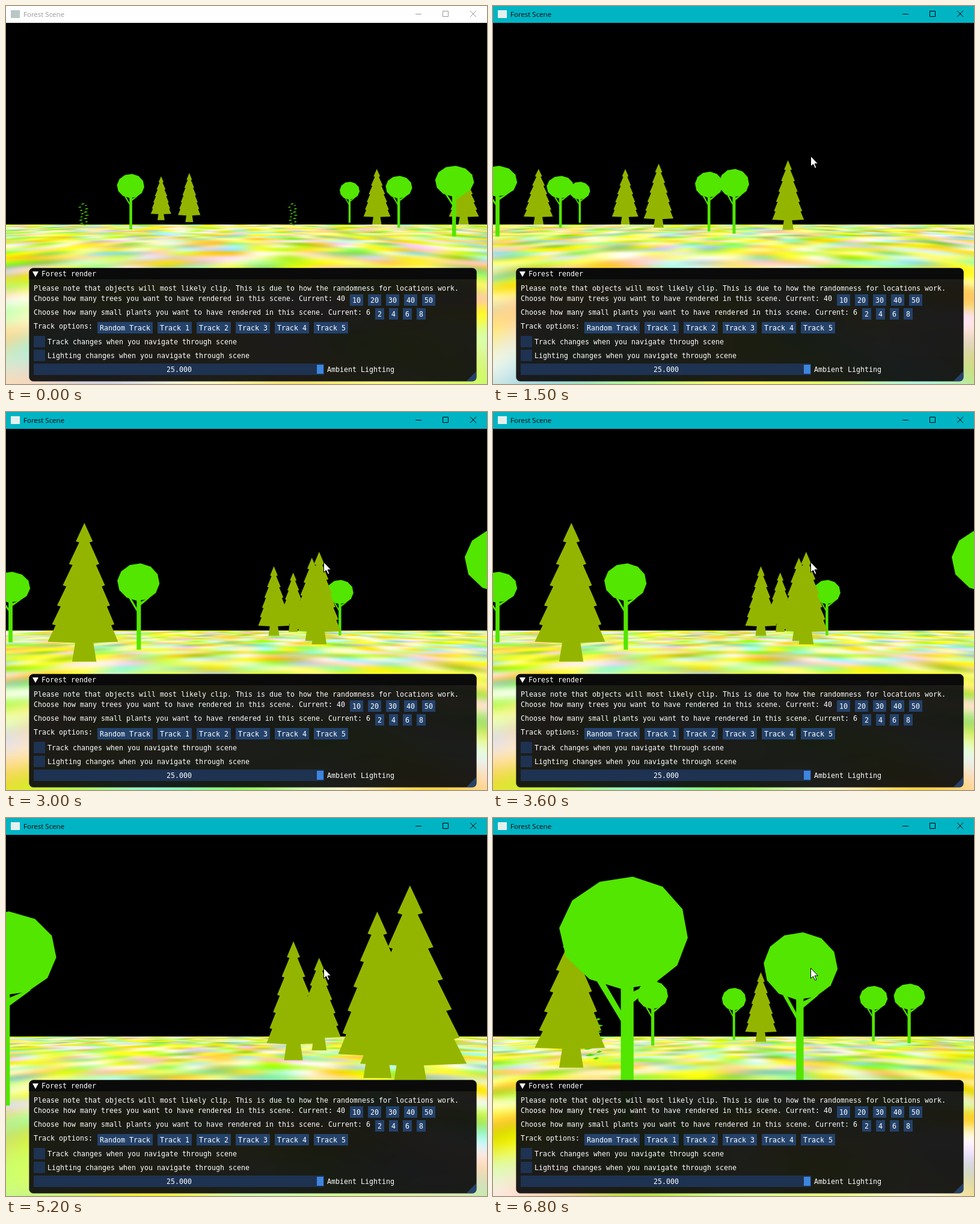
Animation of 800x628 px, one loop 7200 ms. Source, as an HTML page with a canvas:

```html
<!DOCTYPE html>
<html lang="en">
<head>
<meta charset="utf-8">
<title>Forest Scene</title>
<style>
  html, body { margin: 0; height: 100%; overflow: hidden; background: #000; }
  canvas { display: block; }
</style>
</head>
<body>
<canvas id="stage" width="800" height="628"></canvas>
<script>
const ctx = document.getElementById('stage').getContext('2d');
const LOOP = 7200, STEP = 100;
const FOCAL = 541, CX = 400, CY = 328.5, FAR = 20, HORIZON = 363, EYE = 1.27;
const CELLS = 1.5, CELL = 24, TEXEL = CELLS * CELL;   // cells per unit, texels per cell and per unit

let seed = 11;
const random = () => (seed = seed * 16807 % 2147483647) / 2147483647;
const range = (n, f) => Array.from({ length: n }, (_, i) => f(i));
const mirror = side => [...side, ...side.map(([r, y]) => [-r, y]).reverse()];

// Outlines in world units: [signed distance from the axis, height below eye level]
function roundTree() {
  const crown = range(12, i => {
    const a = (i * 30 + 5) * Math.PI / 180;
    return [.555 * Math.sin(a), -.763 - .52 * Math.cos(a)];
  });
  const trunk = mirror([[.056, -.3], [.056, 1.104]]);
  const branch = (side, reach, fork) =>
    [[side * .05, fork], [side * reach, -.32], [side * (reach - .07), -.3], [side * .05, fork - .1]];
  return [crown, trunk, branch(-1, .26, .06), branch(1, .28, -.12)];
}

function pineTree() {
  const tiers = range(6, i => {
    const r = .14 + .115 * i - .0055 * i * i, y = -1.26 + .43 * i - .012 * i * i;
    return [[r, y], [r - .055, y + .018]];
  }).flat().slice(0, -1);
  return [mirror([[0, -1.6], ...tiers, [.15, .61], [.2, .957]])];
}

function plant() {
  return range(14, i => {
    const x = (i % 2 ? .13 : -.13) * (.3 + random()), y = i * .07, w = .05 + random() * .06;
    return [[x - w, y + .02], [x, y - .02], [x + w, y], [x, y + .03]];
  });
}

const grove = (parts, color, offset, places) => places.split(' ').map(place => {
  const [x, z] = place.split(',').map(Number);
  return { parts, color, x: x + offset, z };
});
const forest = [
  ...grove(roundTree(), '#52e600', .02,
    '7,11 7,15 6,19 -5,14 14,13 15,12 7,23 12,29 19,25 7,31 19,34 32,28 30,37 33,40 34,30 39,39 40,38'),
  ...grove(pineTree(), '#94b500', .01,
    '6,15 10,15 -5,19 -3,17 12,13 5,25 11,23 12,26 17,29 17,12 16,32 17,34 17,30 30,31 34,37'),
  ...grove(plant(), '#4cd800', 0, '2,14 -7,14 30,32')
].sort((a, b) => b.z - a.z);

function makeGround(columns, rows) {
  const cells = new OffscreenCanvas(columns, rows), c = cells.getContext('2d');
  for (let i = 0; i < columns * rows; i++) {
    c.fillStyle = `rgb(${130 + random() * 220},${195 + random() * 110},${random() * 280 - 10})`;
    c.fillRect(i % columns, Math.floor(i / columns), 1, 1);
  }
  const smooth = new OffscreenCanvas(columns * CELL, rows * CELL), s = smooth.getContext('2d');
  s.imageSmoothingQuality = 'high';
  s.drawImage(cells, 0, 0, smooth.width, smooth.height);
  return smooth;
}
const ground = makeGround(110, 75);

function cameraAt(t) {
  for (const [from, to] of [[2400, 3000], [5800, 6000], [6300, 6500]]) if (t > from && t < to) t = from;
  const walk = (from, to, units) => Math.round(units * Math.min(1, Math.max(0, (t - from) / (to - from))));
  return {
    x: walk(0, 1000, 5) + walk(1000, 1500, 10) + walk(5200, 6800, 18),
    z: walk(1500, 2500, 20) + walk(4500, 5000, 5)
  };
}

function rect(x, y, w, h, color) {
  ctx.fillStyle = color;
  ctx.fillRect(x, y, w, h);
}

function polygon(points, color) {
  ctx.beginPath();
  points.forEach(p => ctx.lineTo(...p));
  ctx.closePath();
  ctx.fillStyle = color;
  ctx.fill();
}

function drawGround(cam) {
  for (let y = HORIZON; y < 628; y++) {
    const z = EYE * FOCAL / (y + .5 - CY), width = 800 * z / FOCAL;
    ctx.drawImage(ground, (cam.x + 20 - width / 2) * TEXEL, Math.floor((cam.z + z) * TEXEL),
      width * TEXEL, 1, 0, y, 800, 1);
  }
}

// Trees are solids of revolution: edges are tangent rays, so they widen away from the centre
function drawTree(tree, cam) {
  const x = tree.x - cam.x, z = tree.z - cam.z;
  if (z < 1 || z >= FAR) return;
  const angle = Math.atan2(x, z), distance = Math.hypot(x, z);
  const project = ([r, y]) =>
    [CX + FOCAL * Math.tan(angle + Math.asin(r / distance)), CY + y * FOCAL / z];
  for (const part of tree.parts) polygon(part.map(project), tree.color);
}

function drawTitleBar(focused) {
  const ink = focused ? '#000' : '#999';
  rect(0, 0, 800, 28, focused ? '#00b4c4' : '#fff');
  rect(8, 7, 15, 13, focused ? '#e4f0ee' : '#b8c6c6');
  ctx.font = '11.5px "Open Sans", sans-serif';
  ctx.fillStyle = ink;
  ctx.fillText('Forest Scene', 29, 18);
  ctx.strokeStyle = ink;
  ctx.lineWidth = 1;
  ctx.stroke(new Path2D('M681 13.5h10M726.5 8.5h9v9h-9zM772 8l10 10M782 8l-10 10'));
}

function text(string, x, y) {
  ctx.fillStyle = '#fff';
  ctx.fillText(string, x, y);
}

function drawPanel() {
  const left = 46, button = '#24426a', field = '#1e3251';
  const row = (label, y, options = []) => {
    text(label, left, y);
    let x = left + label.length * 7 + 8;
    for (const option of options) {
      const w = option.length * 7 + 8;
      rect(x, y - 11, w, 19, button);
      text(option, x + 4, y + 3);
      x += w + 8;
    }
  };

  ctx.save();
  ctx.beginPath();
  ctx.roundRect(38.5, 435.5, 744, 188, 7);
  ctx.fillStyle = 'rgba(15,15,15,.94)';
  ctx.fill();
  ctx.strokeStyle = 'rgba(80,80,90,.5)';
  ctx.stroke();
  ctx.clip();
  rect(38, 435, 745, 19, '#0a0a0a');
  polygon([[782, 607], [782, 623], [766, 623]], button);
  ctx.restore();

  ctx.font = '11.63px "DejaVu Sans Mono", monospace';
  polygon([[44, 441], [54, 441], [49, 450]], '#fff');
  text('Forest render', 59, 449);
  row('Please note that objects will most likely clip. This is due to how the randomness for locations work.', 473);
  row('Choose how many trees you want to have rendered in this scene. Current: 40', 490, ['10', '20', '30', '40', '50']);
  row('Choose how many small plants you want to have rendered in this scene. Current: 6', 513, ['2', '4', '6', '8']);
  row('Track options:', 536, ['Random Track', ...range(5, i => `Track ${i + 1}`)]);
  ['Track', 'Lighting'].forEach((what, i) => {
    const y = 548 + i * 23;
    rect(left, y, 19, 19, field);
    text(what + ' changes when you navigate through scene', 69, y + 14);
  });
  rect(left, 594, 483, 19, field);
  rect(517, 596, 11, 15, '#3d85e0');
  text('25.000', 267, 608);
  text('Ambient Lighting', 534, 608);
}

function drawCursor() {
  const arrow = new Path2D('M528.5 249.5v17l4-3.5 3 6.5 2.5-1-3-6.5h5.5z');
  ctx.fillStyle = '#fff';
  ctx.fill(arrow);
  ctx.strokeStyle = '#000';
  ctx.stroke(arrow);
}

let shown = -1;
function frame(now) {
  const t = Math.floor(now % LOOP / STEP) * STEP;
  if (t !== shown) {
    shown = t;
    const cam = cameraAt(t);
    rect(0, 0, 800, 628, '#000');
    drawGround(cam);
    forest.forEach(tree => drawTree(tree, cam));
    drawTitleBar(t > 0);
    drawPanel();
    if (t > 0) drawCursor();
  }
  requestAnimationFrame(frame);
}
frame(0);
</script>
</body>
</html>
```
